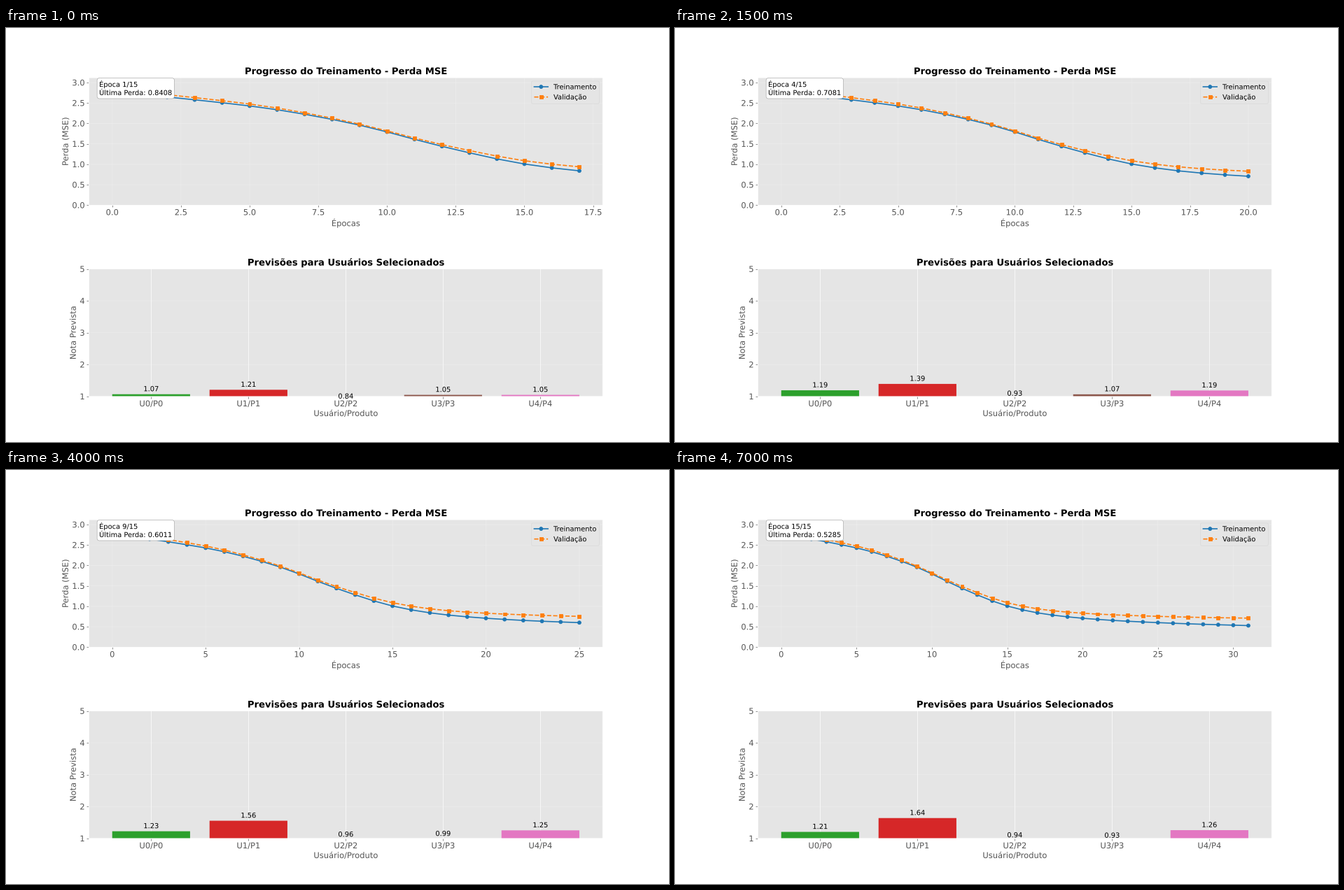
Animation of 947 by 592 pixels, one loop 7.5 s. Source, as a matplotlib script:

```python
import matplotlib.pyplot as plt
import numpy as np
from matplotlib.animation import FuncAnimation
from matplotlib.patheffects import Normal

EPOCHS = 15
FIRST = 17  # index of the last loss point shown in the first epoch
DPI = 947 / 16

plt.rcParams.update({
    "font.family": "DejaVu Sans",
    "text.hinting": "none",
    "path.snap": False,
    "path.effects": [Normal()],  # draws text and markers at sub-pixel positions
    "axes.facecolor": "#E5E5E5",
    "axes.edgecolor": "white",
    "axes.linewidth": 1,
    "axes.grid": True,
    "axes.axisbelow": True,
    "axes.labelcolor": "#555555",
    "axes.labelsize": 14,
    "axes.titlesize": 16,
    "axes.titleweight": "bold",
    "grid.color": "white",
    "grid.linewidth": 0.8,
    "legend.fontsize": 12,
    "patch.linewidth": 0.5,
    "xtick.color": "#555555",
    "ytick.color": "#555555",
    "xtick.labelsize": 14,
    "ytick.labelsize": 14,
})


def smooth(x, keys, values):
    """Cubic Hermite curve through a few key points."""
    keys, values = np.array(keys, float), np.array(values, float)
    slopes = np.gradient(values, keys)
    i = np.clip(np.searchsorted(keys, x, side="right") - 1, 0, len(keys) - 2)
    h = keys[i + 1] - keys[i]
    t = (x - keys[i]) / h
    ease = t * t * (3 - 2 * t)
    return (values[i] + (values[i + 1] - values[i]) * ease
            + h * t * (1 - t) * ((1 - t) * slopes[i] - t * slopes[i + 1]))


steps = np.arange(FIRST + EPOCHS)
train = smooth(steps, [0, 3, 6, 9, 12, 15, 17, 19, 21, 23, 25, 27, 31],
               [2.775, 2.579, 2.336, 1.959, 1.440, 1.008, 0.8408,
                0.7430, 0.6799, 0.6353, 0.6011, 0.5724, 0.5285])
valid = train + smooth(steps, [0, 5, 10, 15, 20, 31],
                       [0.061, 0.047, 0.026, 0.080, 0.123, 0.1825])

# Predicted rating of each user/product pair at a few epochs
rating_keys = [0, 2, 4, 8, 14]
ratings = {
    "U0/P0": [1.07, 1.17, 1.206, 1.226, 1.206],
    "U1/P1": [1.21, 1.344, 1.436, 1.556, 1.64],
    "U2/P2": [0.84, 0.91, 0.942, 0.962, 0.94],
    "U3/P3": [1.05, 1.08, 1.046, 0.986, 0.93],
    "U4/P4": [1.05, 1.16, 1.204, 1.254, 1.26],
}
colors = ["tab:green", "tab:red", "tab:purple", "tab:brown", "tab:pink"]
curves = [smooth(np.arange(EPOCHS), rating_keys, r) for r in ratings.values()]

fig, (ax_loss, ax_pred) = plt.subplots(
    2, 1, figsize=(16, 592.001 / DPI), dpi=DPI, gridspec_kw={"hspace": 0.5})

ax_loss.set_title("Progresso do Treinamento - Perda MSE")
ax_loss.set_xlabel("Épocas")
ax_loss.set_ylabel("Perda (MSE)")
ax_loss.set_ylim(0, 3.12)
ax_loss.grid(True, alpha=0.3)
train_line, = ax_loss.plot([], [], "o-", color="tab:blue", lw=2, label="Treinamento")
valid_line, = ax_loss.plot([], [], "s--", color="tab:orange", lw=2, label="Validação")
ax_loss.legend(loc="upper right")
info = ax_loss.text(
    0.02, 0.98, "", transform=ax_loss.transAxes, fontsize=12, va="top",
    linespacing=1.28,
    bbox=dict(boxstyle="round", facecolor="white", edgecolor="gray"))

ax_pred.set_title("Previsões para Usuários Selecionados")
ax_pred.set_xlabel("Usuário/Produto")
ax_pred.set_ylabel("Nota Prevista")
ax_pred.grid(axis="y", alpha=0.3)
bars = ax_pred.bar(list(ratings), [c[0] for c in curves], color=colors)
ax_pred.set_ylim(1, 5)
ax_pred.set_yticks(range(1, 6))
labels = [ax_pred.text(i, 0, "", ha="center", va="bottom", fontsize=12)
          for i in range(len(bars))]


def update(epoch):
    last = FIRST + epoch
    shown = slice(last + 1)
    train_line.set_data(steps[shown], train[shown])
    valid_line.set_data(steps[shown], valid[shown])
    ax_loss.set_xlim(-0.05 * last, 1.05 * last)
    info.set_text(f"Época {epoch + 1}/{EPOCHS}\nÚltima Perda: {train[last]:.4f}")

    for bar, label, curve in zip(bars, labels, curves):
        rating = curve[epoch]
        bar.set_height(rating)
        label.set_y(rating + 0.05)
        label.set_text(f"{rating:.2f}")
    return [train_line, valid_line, info, *bars, *labels]


anim = FuncAnimation(fig, update, frames=EPOCHS, interval=500, repeat=True)
plt.show()
```
